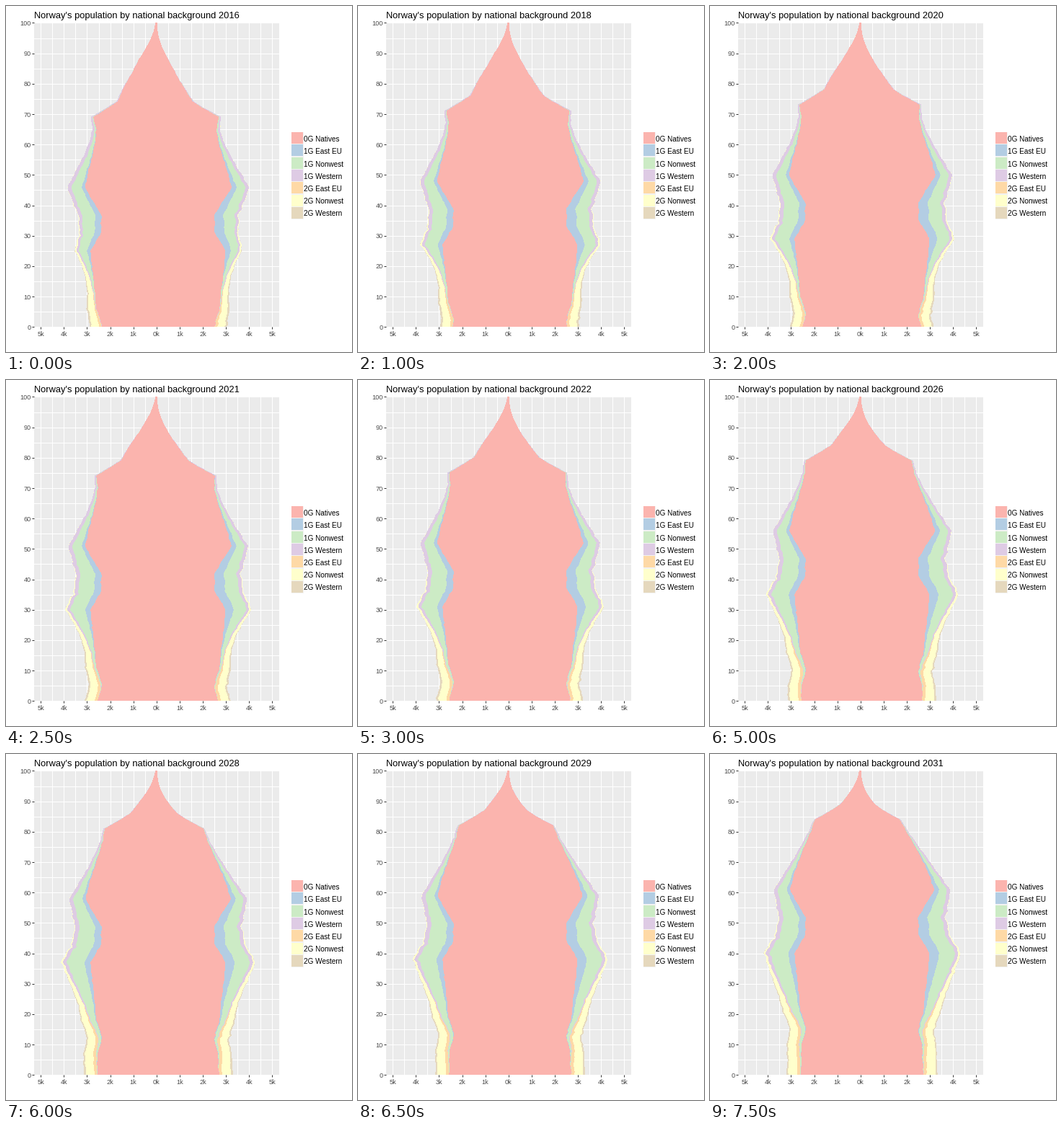
These frames come from a looping animation (480 px wide and 480 px high, 8000 ms). A matplotlib script:

```python
import matplotlib.pyplot as plt
import numpy as np
from matplotlib.animation import FuncAnimation
from matplotlib.patches import Rectangle

SIZE, DPI = 480, 80
YEARS = 16
LEFT, RIGHT, TOP, BOTTOM = 39, 379, 23.45, 445.33
ZERO, PER_K = 208.78, 32.1  # pixel of 0k, pixels per thousand

GROUPS = {"0G Natives": "#FBB4AE", "1G East EU": "#B3CDE3",
          "1G Nonwest": "#CCEBC5", "1G Western": "#DECBE4",
          "2G East EU": "#FED9A6", "2G Nonwest": "#FFFFCC",
          "2G Western": "#E5D8BD"}

# A cohort is named by its age in 2016; sizes are in pixels.
COHORTS = np.arange(1 - YEARS, 101)
AGES = np.arange(101)


def curve(*points):
    return np.interp(COHORTS, *zip(*points))


def hump(height, peak, below, above):
    """Bell with its own spread on each side of the peak."""
    d = COHORTS - peak
    return height * np.exp(-.5 * (d / np.where(d < 0, below, above)) ** 2)


def fade(height, mid, slope):
    return height / (1 + np.exp((COHORTS - mid) / slope))


def alive(mode):
    """Gompertz survival by age."""
    return np.exp(-np.exp((AGES - mode) / 7.2))


# Baby booms and busts
BIRTHS = curve((-15, 82.5), (-5, 81), (0, 75), (6, 83), (25, 91), (31, 76),
               (37, 76), (46, 99), (60, 86), (65, 85), (69, 91.5),
               (74, 58.5), (83, 49), (100, 39))
SEX_RATIO = curve((45, 1.05), (70, 1), (82, .87))

SECOND_GEN = [fade(4, 6, 2.5), fade(13, 12, 9)]
FIRST = np.array([hump(9, 32, 6.5, 12), hump(18, 36, 11, 14),
                  hump(5.5, 46, 18, 18), *SECOND_GEN, fade(2.8, 14, 4)])
LAST = np.array([hump(10, 31, 13, 12), hump(25.5, 28, 16, 15),
                 hump(6, 35, 18, 22), *SECOND_GEN, fade(1.8, 14, 4)])

rng = np.random.default_rng(7)


def side(ratio, mode, shares):
    """Natives, rough shares of the other groups, and survival."""
    base = BIRTHS * ratio + rng.normal(0, .5, len(COHORTS))
    rough = rng.normal(1, .03, FIRST.shape) * np.array(shares)[:, None]
    return base, rough, alive(mode)


SIDES = [side(1, 90.8, (1, 1, 1, 1, 1, 1)),
         side(SEX_RATIO, 88.4, (1.5, .88, .9, 1, 1, 1))]

# Adults gain migrants early on, children once they grow up
BORN = np.maximum(-COHORTS, 0)
POWER = curve((10, 1.5), (25, .4))


def growth(t):
    span = np.maximum(YEARS - 1 - BORN, 1)
    return (np.maximum(t - BORN, 0) / span) ** POWER


def edges_at(t):
    """Outer edges of all groups by age, in thousands, left and right."""
    pick = AGES - t + YEARS - 1
    others = FIRST + (LAST - FIRST) * growth(t)
    return [np.cumsum(np.vstack([base, others * rough])[:, pick] * living,
                      axis=0) / PER_K
            for base, rough, living in SIDES]


plt.rcParams["font.family"] = "Liberation Sans"
fig = plt.figure(figsize=(SIZE / DPI, SIZE / DPI), dpi=DPI, facecolor="white")


def pt(px):
    return px * 72 / DPI


def text(x, y, s, px):
    return fig.text(x / SIZE, 1 - y / SIZE, s, fontsize=pt(px), va="baseline")


def box(x, y, w, h, color):
    fig.add_artist(Rectangle((x / SIZE, 1 - (y + h) / SIZE), w / SIZE, h / SIZE,
                             transform=fig.transFigure, fc=color, lw=0))


ax = fig.add_axes([LEFT / SIZE, 1 - BOTTOM / SIZE,
                   (RIGHT - LEFT) / SIZE, (BOTTOM - TOP) / SIZE],
                  facecolor="#EBEBEB")
ax.set_xticks(range(-5, 6), [f"{abs(k)}k" for k in range(-5, 6)])
ax.set_yticks(range(0, 101, 10))
ax.set_xticks(np.arange(-4.5, 5), minor=True)
ax.set_yticks(range(5, 100, 10), minor=True)
ax.set_axisbelow(True)
ax.grid(which="both", color="white", lw=pt(1), antialiased=False)
ax.tick_params(which="major", length=pt(3), width=pt(1), color="#333333",
               labelcolor="#4D4D4D", labelsize=pt(9.2))
ax.tick_params(which="minor", length=0)
ax.tick_params(axis="x", pad=pt(3))
ax.tick_params(axis="y", pad=pt(1.5))
ax.spines[:].set_visible(False)

title = text(39, 17, "", 12.85)

box(395.5, 175, 17, 121, "#F2F2F2")
for i, (name, color) in enumerate(GROUPS.items()):
    box(396, round(175.2 + 17.28 * i), 16, 16, color)
    text(413, 188.2 + 17.2 * i, name, 10.05)

# Wider bands lie below narrower ones
bands = [ax.fill([0, 0, 0], [0, 0, 0], color=c, lw=0, antialiased=False,
                 zorder=10 - i)[0]
         for i, c in enumerate(GROUPS.values())]
ax.set_xlim((LEFT - ZERO) / PER_K, (RIGHT - ZERO) / PER_K)
ax.set_ylim(0, 100)


def draw(t):
    title.set_text(f"Norway's population by national background {2016 + t}")
    for band, left, right in zip(bands, *edges_at(t)):
        band.set_xy(np.column_stack([np.r_[-left, right[::-1]],
                                     np.r_[AGES, AGES[::-1]]]))
    return [title, *bands]


anim = FuncAnimation(fig, draw, frames=YEARS, interval=500, repeat=True,
                     repeat_delay=0, blit=False)
plt.show()
```
